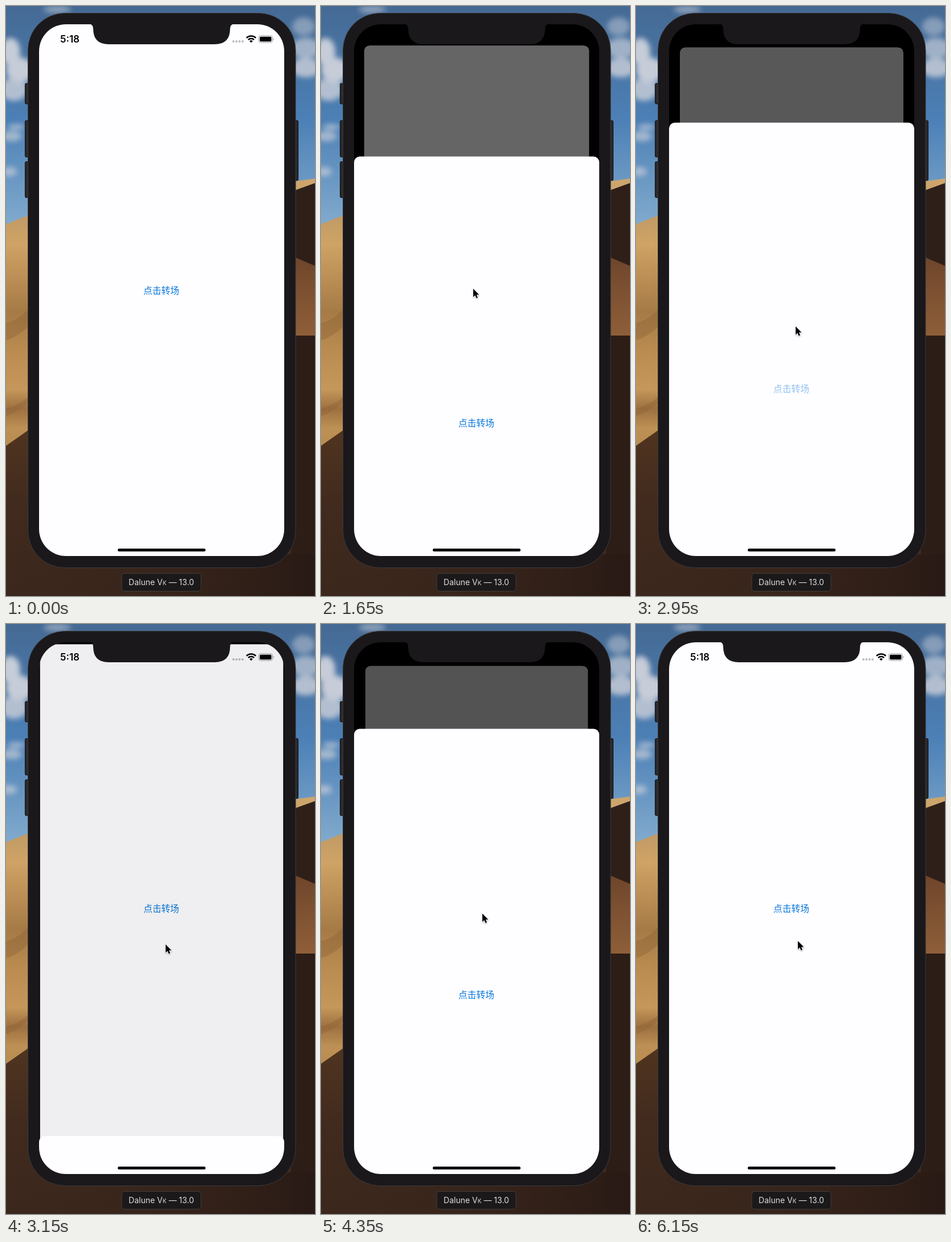
An HTML page that plays this animation: 542 px wide and 1033 px high, repeating every 6200 ms.

```html
<!DOCTYPE html>
<html lang="zh">
<head>
<meta charset="utf-8">
<title>Card transition</title>
<style>
  html, body { margin: 0; width: 100%; height: 100%; overflow: hidden; background: #2c1c16; }
  svg { display: block; width: 100%; height: 100%; }
  .link { font: 15.75px "Noto Sans CJK SC", "Noto Sans CJK", sans-serif; fill: #0878dc; text-anchor: middle; }
  .clock { font: 600 17px Inter, sans-serif; text-anchor: middle; }
  .device { font: 14px Inter, sans-serif; fill: #dedcdc; text-anchor: middle; }
</style>
</head>
<body>
<svg viewBox="0 0 542 1033">
  <defs>
    <linearGradient id="sky" x2="0" y2="1">
      <stop offset="0" stop-color="#456a94"/>
      <stop offset=".5" stop-color="#4c80b6"/>
      <stop offset="1" stop-color="#86aecf"/>
    </linearGradient>
    <linearGradient id="sand" x2="0" y2="1">
      <stop offset="0" stop-color="#c09a66"/>
      <stop offset=".12" stop-color="#cfa365"/>
      <stop offset=".4" stop-color="#a67a45"/>
      <stop offset=".55" stop-color="#b98b50"/>
      <stop offset=".72" stop-color="#c5975a"/>
      <stop offset=".8" stop-color="#9d7040"/>
      <stop offset=".88" stop-color="#bd9055"/>
      <stop offset="1" stop-color="#b58a50"/>
    </linearGradient>
    <linearGradient id="slope" x2="0" y2="1">
      <stop offset="0" stop-color="#6e452b"/>
      <stop offset="1" stop-color="#94633b"/>
    </linearGradient>
    <linearGradient id="shade" x2="0" y2="1">
      <stop offset="0" stop-color="#50341f"/>
      <stop offset=".45" stop-color="#412a1e"/>
      <stop offset="1" stop-color="#3b271c"/>
    </linearGradient>
    <linearGradient id="floor">
      <stop offset="0" stop-color="#3b271c" stop-opacity="0"/>
      <stop offset="1" stop-color="#291a15"/>
    </linearGradient>
    <filter id="soft" x="-50%" y="-50%" width="200%" height="200%"><feGaussianBlur stdDeviation="5"/></filter>
    <filter id="drop" x="-50%" y="-50%" width="200%" height="200%">
      <feDropShadow dx="0" dy="1" stdDeviation="1" flood-opacity=".4"/>
    </filter>
    <clipPath id="screen"><rect x="58" y="32" width="430" height="931" rx="47"/></clipPath>
  </defs>

  <!-- desert backdrop -->
  <rect width="542" height="400" fill="url(#sky)"/>
  <g fill="#c6ccd8" filter="url(#soft)">
    <ellipse cx="8" cy="80" rx="17" ry="24"/>
    <ellipse cx="24" cy="112" rx="24" ry="22"/>
    <ellipse cx="14" cy="146" rx="24" ry="20" opacity=".85"/>
    <ellipse cx="18" cy="212" rx="15" ry="5" opacity=".7"/>
    <ellipse cx="10" cy="228" rx="18" ry="9" opacity=".7"/>
    <ellipse cx="6" cy="290" rx="13" ry="8" opacity=".7"/>
    <ellipse cx="90" cy="6" rx="24" ry="6" opacity=".6"/>
    <ellipse cx="522" cy="36" rx="20" ry="16" opacity=".5"/>
    <ellipse cx="526" cy="74" rx="26" ry="18" opacity=".7"/>
    <ellipse cx="526" cy="108" rx="26" ry="17" opacity=".85"/>
  </g>
  <path d="M0 382L40 366V790H0Z" fill="url(#sand)"/>
  <path d="M0 555Q22 550 40 530V560Q20 580 0 585ZM0 705Q20 700 40 684V694Q20 712 0 718Z" fill="#8d6135" opacity=".4"/>
  <path d="M0 770L40 742H542V1033H0Z" fill="url(#shade)"/>
  <path d="M500 308L542 302V600H500Z" fill="#cda56c"/>
  <path d="M500 325L542 310V600H500Z" fill="#2f1f19"/>
  <path d="M500 437L542 455V600H500Z" fill="url(#slope)"/>
  <path d="M500 577H542V1033H500Z" fill="#2d1d17"/>
  <rect y="960" width="542" height="73" fill="url(#floor)"/>

  <!-- device -->
  <g fill="#29292b" stroke="#111113">
    <rect x="33.5" y="135.5" width="8" height="36" rx="2"/>
    <rect x="33.5" y="200.5" width="8" height="64" rx="2"/>
    <rect x="33.5" y="272.5" width="8" height="63" rx="2"/>
    <rect x="504.5" y="200.5" width="8" height="105" rx="2"/>
  </g>
  <rect x="38.5" y="12.5" width="469.5" height="971" rx="65" fill="#1a181b" stroke="#3c3a3b"/>

  <g clip-path="url(#screen)">
    <rect x="58" y="32" width="430" height="931"/>
    <g id="card">
      <rect id="page" x="58" y="32" width="430" height="931" fill="#fefdff"/>
      <text id="homeLink" class="link" x="272.5" y="504">点击转场</text>
      <rect id="dim" x="58" y="32" width="430" height="931"/>
    </g>
    <g id="sheet">
      <rect x="58" width="430" height="960" rx="10" fill="#fefdff"/>
      <text id="sheetLink" class="link" x="272.5" y="472">点击转场</text>
    </g>
    <text class="clock" x="112" y="64">5:18</text>
    <g opacity=".26">
      <circle cx="399" cy="62" r="2"/><circle cx="404.3" cy="62" r="2"/>
      <circle cx="409.6" cy="62" r="2"/><circle cx="414.9" cy="62" r="2"/>
    </g>
    <g fill="none" stroke="#000" stroke-width="2.5">
      <path d="M421.8 55.8A11.6 11.6 0 0 1 438.2 55.8"/>
      <path d="M424.9 59.2A7.2 7.2 0 0 1 435.1 59.2"/>
    </g>
    <path d="M427.2 61.4A4 4 0 0 1 432.8 61.4L430 64.3Z"/>
    <rect x="443.1" y="52" width="24.4" height="12" rx="3.5" fill="none" stroke="#000" stroke-opacity=".4"/>
    <rect x="445" y="53.8" width="20.6" height="8.4" rx="2"/>
    <path d="M468.7 56Q470.6 58 468.7 60Z" opacity=".5"/>
    <rect x="196" y="950" width="154" height="5" rx="2.5"/>
  </g>
  <path d="M146 31.5Q153 32 153 40Q153 67 180 67H366Q393 67 393 40Q393 32 400 31.5Z" fill="#1a181b"/>

  <rect x="203" y="993.5" width="139" height="31" rx="5" fill="#1b191a" stroke="#443d3a"/>
  <text class="device" x="272.5" y="1014">Dalune V<tspan font-size="10">K</tspan> — 13.0</text>

  <path id="pointer" d="M0 0V14.6L3.3 11.5L5.5 16.6L8 15.5L5.9 10.6H10.4Z" stroke="#fff" stroke-width="1.2" paint-order="stroke" filter="url(#drop)"/>
</svg>
<script>
const LOOP = 6200, STEP = 50;
const REST = 963, TOP = 89;

// start time, stiffness, direction
const moves = [
  [1439, 14.2, 1],
  [2915, 18, -1],
  [4083, 14.2, 1],
  [5579, 18, -1]
];

// time, x, y of the pointer tip
const path = [
  [0, 296, 1045], [250, 292, 960], [950, 267, 495], [1900, 267, 495],
  [2550, 280, 561], [3300, 280, 561], [3850, 284, 497], [4200, 284, 497],
  [4350, 283, 507], [4850, 283, 555], [5650, 283, 555], [6000, 284, 555], [6200, 284, 555]
];

const el = id => document.getElementById(id);
const [card, page, dim, sheet, homeLink, sheetLink, pointer] =
  ["card", "page", "dim", "sheet", "homeLink", "sheetLink", "pointer"].map(el);

function spring(ms, w) {
  if (ms <= 0) return 0;
  if (ms > 600) return 1;
  const u = w * ms / 1000;
  return 1 - (1 + u) * Math.exp(-u);
}

// A tap dims the link, then it fades back after release.
function linkAlpha(t, dir) {
  let a = 1;
  for (const [start, , d] of moves) {
    const ms = t - start + 70;
    if (d === dir && ms > -100) a = ms < 0 ? .2 : Math.min(1, .2 + .8 * ms / 350);
  }
  return a;
}

function pointerAt(t) {
  const i = path.findIndex(k => k[0] > t);
  const [t0, x0, y0] = path[i - 1], [t1, x1, y1] = path[i];
  const u = (t - t0) / (t1 - t0), e = u * u * (3 - 2 * u);
  return [x0 + (x1 - x0) * e, y0 + (y1 - y0) * e];
}

function draw(t) {
  const p = moves.reduce((sum, [start, w, dir]) => sum + dir * spring(t - start, w), 0);
  const k = 1 - .104 * p;
  const y = 32 + 46.8 * p - 32 * k;
  card.setAttribute("transform", `translate(${273 * (1 - k)} ${y}) scale(${k})`);
  const r = p > .001 ? 10 : 0;
  page.setAttribute("rx", r);
  dim.setAttribute("rx", r);
  dim.setAttribute("opacity", .75 * p);
  sheet.setAttribute("transform", `translate(0 ${REST - (REST - TOP) * p})`);
  homeLink.setAttribute("opacity", linkAlpha(t, 1));
  sheetLink.setAttribute("opacity", linkAlpha(t, -1));
  pointer.setAttribute("transform", `translate(${pointerAt(t)})`);
}

const begin = performance.now();
let last = -1;
function tick(now) {
  const t = Math.floor(Math.max(0, now - begin) % LOOP / STEP) * STEP;
  if (t !== last) draw(last = t);
  requestAnimationFrame(tick);
}
draw(0);
requestAnimationFrame(tick);
</script>
</body>
</html>
```
